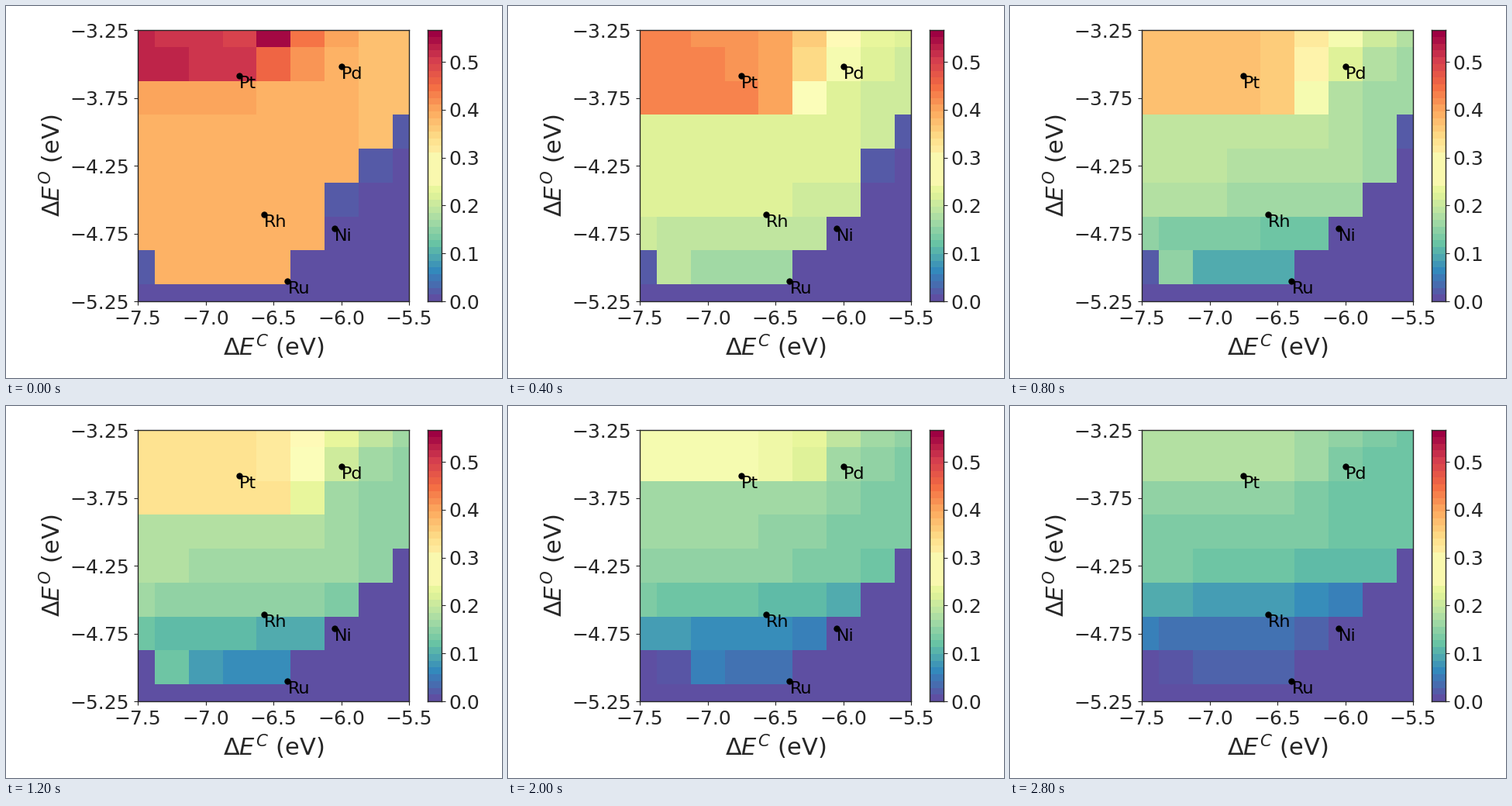
These frames come from a looping animation (640 px wide and 480 px high, 3 s). A matplotlib script:

```python
import numpy as np
import matplotlib.pyplot as plt
from matplotlib.animation import FuncAnimation

W, H, DPI = 640, 480, 100
FRAMES, STEP = 15, 200
N = 9                      # grid points per axis
VMAX = 0.5663
BANDS = 40
INK = "0.15"

plt.rcParams.update({
    "font.family": "DejaVu Sans",
    "mathtext.fontset": "dejavusans",
    "text.color": INK, "axes.labelcolor": INK, "axes.edgecolor": INK,
    "xtick.color": INK, "ytick.color": INK,
    "axes.linewidth": 1.0,
})

row, col = np.mgrid[:N, :N]


def sigmoid(x):
    return 1 / (1 + np.exp(-x))


def snap(v):
    """Move values to the middle of their colour band."""
    band = VMAX / BANDS
    return (np.floor(v / band) + 0.5) * band


def coverage(t):
    """Map at frame t: a hot plateau on a decaying base, cut by a staircase."""
    settle = np.exp(-t / 1.2)
    base = 0.195 - 0.0037 * t + 0.193 * settle
    peak = 0.450 - 0.0190 * t + 0.075 * settle

    # Plateau in the top rows; its third row joins late and leaves early
    third = np.clip(min(t, 10 - t) / 2, 0.1, 1)
    reach = np.select([row < 2, row == 2], [1, third], 0)
    edge = 5.8 - 0.45 * row - 1.2 * np.exp(-t)
    width = np.maximum(0.8 - 0.25 * row, 0.3)
    v = base + (peak - base) * reach * sigmoid((edge - col) / width)

    # Low rows and right columns sink, both fronts creeping inwards
    ease = 1 - np.exp(-t / 2.3)
    tilt = 0.1 * (np.minimum(col, 4) - 2)
    v -= 0.123 * ease * sigmoid((row - 6.3 + 0.09 * t + tilt) / 0.55)
    v -= 0.02 * sigmoid((col - 6.6 + 0.12 * t) / 0.4)

    # Two lone spots
    v[0, 4] += 0.085 * np.exp(-2 * t)
    v[7, 1] += 0.05 * ease * np.tanh(9 - t)
    v = snap(np.maximum(v, 0))

    # Staircase, whose steps open one after another from below
    stair = row + col
    v[(stair == N + 2) & (t <= 2 * (5 - row))] = 0.012
    v[(stair > N + 2) | (row == N - 1)] = 0
    v[7, 0] = 0.012 if t < 6 else 0
    return v


def axes_at(x, y, w, h):
    """Axes placed in pixels from the top left corner."""
    return fig.add_axes([x / W, 1 - (y + h) / H, w / W, h / H])


fig = plt.figure(figsize=(W / DPI, H / DPI), dpi=DPI, facecolor="white")

ax = axes_at(170.1, 31.1, 350, 350)
cells = ax.imshow(coverage(0), cmap="Spectral_r", vmin=0, vmax=VMAX,
                  extent=(-7.625, -5.375, -5.375, -3.125),
                  interpolation="nearest", aspect="auto")
ax.set(xlim=(-7.5, -5.5), ylim=(-5.25, -3.25),
       xticks=np.arange(-7.5, -5.4, 0.5), yticks=np.arange(-5.25, -3.2, 0.5))
ax.xaxis.set_major_formatter("{x:.1f}")
ax.yaxis.set_major_formatter("{x:.2f}")
ax.tick_params(labelsize=18, pad=4.5)
ax.set_xlabel(r"$\Delta E^C$ (eV)", fontsize=22)
ax.set_ylabel(r"$\Delta E^O$ (eV)", fontsize=22)

metals = {"Pt": (-6.75, -3.587), "Pd": (-6.0, -3.52), "Rh": (-6.568, -4.61),
          "Ni": (-6.048, -4.714), "Ru": (-6.395, -5.102)}
for name, (x, y) in metals.items():
    ax.plot(x, y, "o", color="black", ms=6, mew=0)
    ax.text(x, y, name, color="black", fontsize=16, ha="left", va="top")

# Colour scale in flat bands, with one wide pale band in the middle
scale = plt.get_cmap("Spectral_r")(np.linspace(0, 1, BANDS))
scale[17:22, :3] = np.array([249, 248, 174]) / 255
bar = axes_at(544.1, 31.1, 17.5, 350)
bar.imshow(scale[:, None, :], origin="lower", extent=(0, 1, 0, VMAX),
           interpolation="nearest", aspect="auto")
bar.set(xticks=[], yticks=np.arange(0, 0.55, 0.1), ylim=(0, VMAX))
bar.yaxis.tick_right()
bar.yaxis.set_major_formatter("{x:.1f}")
bar.tick_params(labelsize=18)


def draw(frame):
    cells.set_data(coverage(frame))
    return [cells]


anim = FuncAnimation(fig, draw, frames=FRAMES, interval=STEP,
                     repeat=True, repeat_delay=0, blit=False)
plt.show()
```
